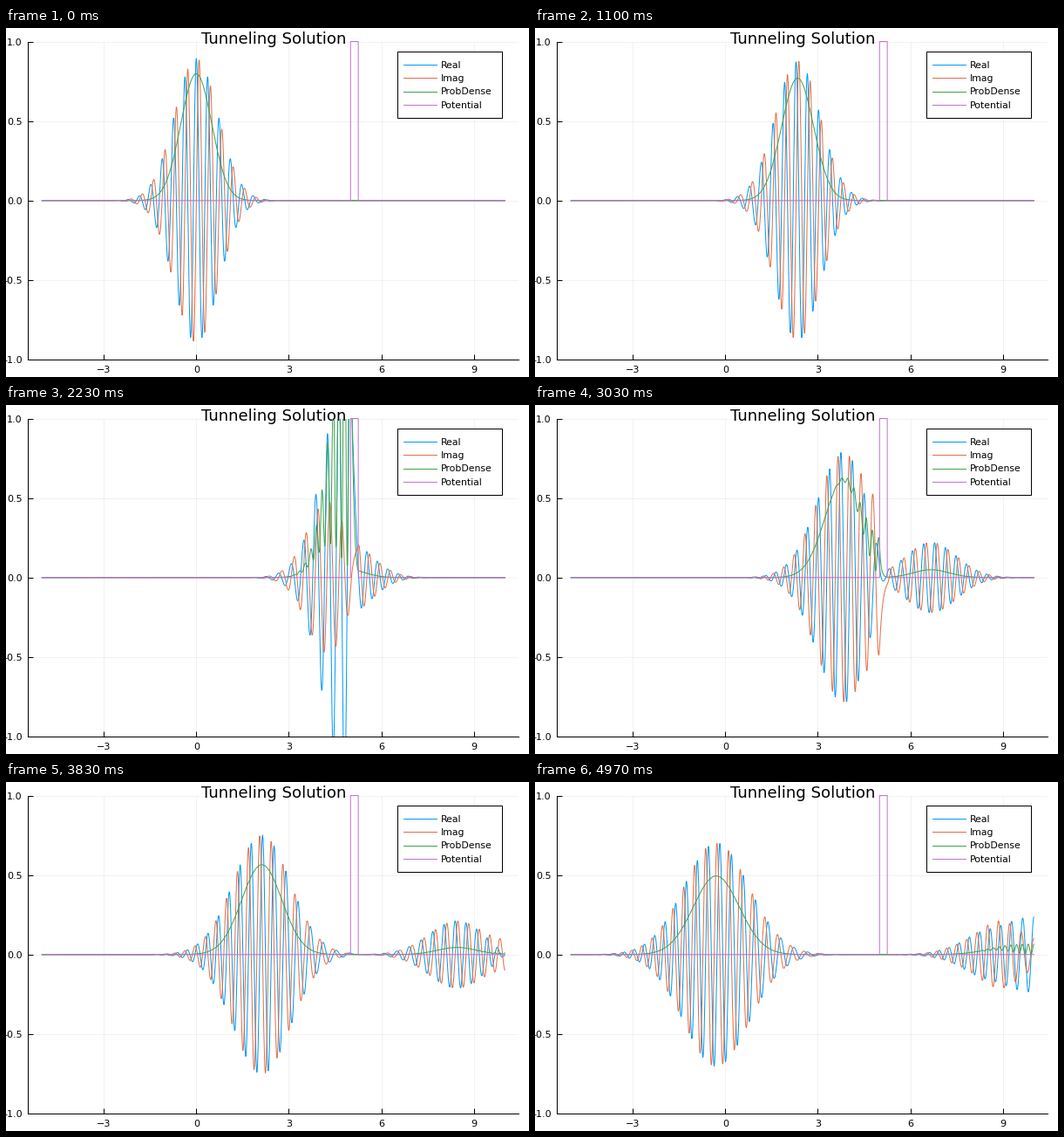
A matplotlib script for the animation above (5010 ms loop, 600x400 px).

```python
import numpy as np
import matplotlib.pyplot as plt
from matplotlib.animation import FuncAnimation
from matplotlib.patches import Rectangle

W, H, DPI = 600, 400, 100
LOOP_MS, TICK_MS = 5010, 15
FPS, STEPS = 30, 150  # the solution advances 30 times a second
PT = 72 / DPI  # points per pixel
COLORS = ["#009afa", "#e36f47", "#3ea44e", "#c371d2"]
LABELS = ["Real", "Imag", "ProbDense", "Potential"]

# Gaussian packet meeting a square barrier, hbar = m = 1
K0, V0, DT = 17.0, 170.0, 0.00421
WALL = (5.0, 5.25)
x = np.linspace(-5, 10, 1201)
dx = x[1] - x[0]

barrier = np.where((x > WALL[0] + 1e-9) & (x < WALL[1] + 1e-9), V0, 0.0)
kinetic = np.full(x.size, 1 / dx**2)
kinetic[[0, -1]] /= 2  # reflecting ends
hop = np.full(x.size - 1, -0.5 / dx**2)
energy, modes = np.linalg.eigh(
    np.diag(kinetic + barrier) + np.diag(hop, 1) + np.diag(hop, -1))
psi0 = (2 / np.pi) ** 0.25 * np.exp(-x**2 + 1j * K0 * x)
coeffs = modes.T @ psi0


def psi_at(t):
    c = coeffs * np.exp(-1j * energy * t)
    return modes @ c.real + 1j * (modes @ c.imag)


plt.rcParams["font.family"] = "DejaVu Sans"
fig = plt.figure(figsize=(W / DPI, H / DPI), dpi=DPI, facecolor="white")
ax = fig.add_axes([25.4 / W, 20 / H, 562.8 / W, 364.5 / H])
ax.set_xlim(-5.45, 10.45)
ax.set_ylim(-1, 1)
ax.set_xticks([-3, 0, 3, 6, 9])
ax.set_yticks([-1, -0.5, 0, 0.5, 1],
              ["-1.0", "-0.5", "0.0", "0.5", "1.0"])
ax.set_axisbelow(True)
ax.grid(color="black", alpha=0.1, linewidth=0.5 * PT)
ax.tick_params(direction="in", length=6 * PT, width=PT, labelsize=11.1 * PT)
ax.tick_params(axis="x", pad=7 * PT)
ax.tick_params(axis="y", pad=6.5 * PT)
for side in ("top", "right"):
    ax.spines[side].set_visible(False)
for side in ("left", "bottom"):
    ax.spines[side].set(linewidth=PT, zorder=1.5)
ax.text(307, H - 17.5, "Tunneling Solution", transform=None, ha="center",
        va="baseline", fontsize=18.1 * PT, zorder=1.6)

# Pixel-space layer for the legend
page = fig.add_axes([0, 0, 1, 1], zorder=2)
page.set_xlim(0, W)
page.set_ylim(H, 0)
page.axis("off")
page.add_patch(Rectangle((448.8, 26.8), 120, 76, facecolor="white",
                         edgecolor="black", linewidth=PT))
for i, (label, color) in enumerate(zip(LABELS, COLORS)):
    y = 42.3 + 15.1 * i
    page.plot([455.5, 493.5], [y, y], color=color, linewidth=PT)
    page.text(498.5, y + 4, label, fontsize=10.9 * PT, va="baseline")

real, imag, dense = (
    ax.plot(x, np.zeros_like(x), color=c, linewidth=PT)[0] for c in COLORS[:3])
ax.plot([x[0], WALL[0], WALL[0], WALL[1], WALL[1], x[-1]],
        [0, 0, 1, 1, 0, 0], color=COLORS[3], linewidth=PT,
        clip_on=False, snap=False)


def update(tick):
    # Hold each step; a tick shows the step reached by its end
    step = min((tick + 1) * TICK_MS * FPS // 1000, STEPS - 1)
    psi = psi_at(step * DT)
    real.set_ydata(psi.real)
    imag.set_ydata(psi.imag)
    dense.set_ydata(np.abs(psi) ** 2)
    return real, imag, dense


anim = FuncAnimation(fig, update, frames=LOOP_MS // TICK_MS, interval=TICK_MS,
                     repeat=True, repeat_delay=0, blit=False)
plt.show()
```
